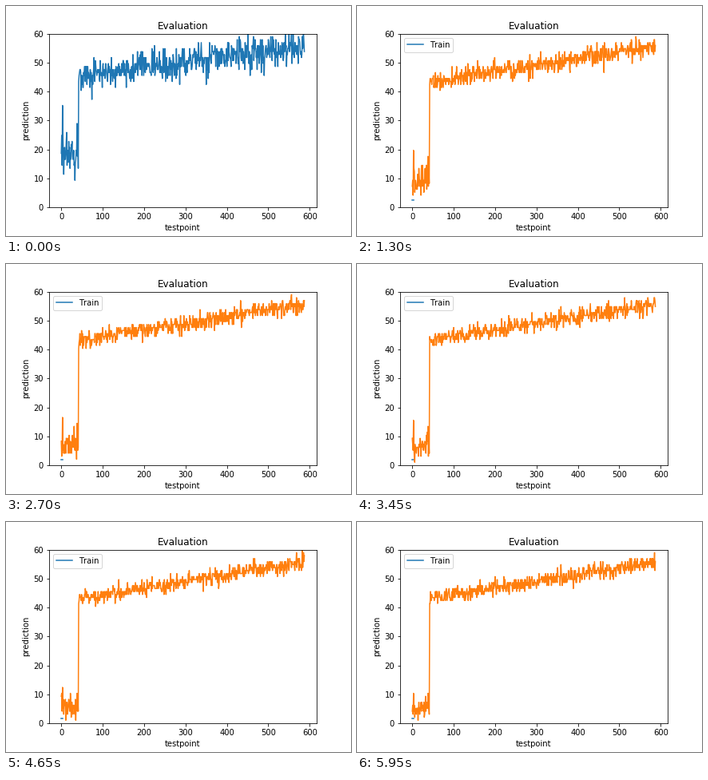
Animation of 432 by 288 pixels, one loop 6 s. Source, as a matplotlib script:

```python
import numpy as np
import matplotlib.pyplot as plt
from matplotlib.animation import FuncAnimation

FRAMES, STEP = 120, 50
POINTS, JUMP = 588, 42
UNIT = 60 / 58  # predictions are whole counts scaled to the axis

x = np.arange(POINTS)
low = x < JUMP
trend = 42.2 + 0.0229 * x


def noise(rng):
    return np.clip(rng.standard_t(8, POINTS) * 0.87, -2.7, 2.7)


# Deviations that persist between epochs, with a spike at each end of the low part
habit = noise(np.random.default_rng(7))
mix = np.full(POINTS, 0.5)
for spot, height in ((2, -1.3), (3, 3.2), (38, 2.8), (41, -0.9)):
    habit[spot], mix[spot] = height, 0.92


def prediction(i):
    early, late = np.exp(-i / 5), np.exp(-i / 50)
    fresh = noise(np.random.default_rng(1000 + i))
    wobble = mix * habit + np.sqrt(1 - mix ** 2) * fresh
    level = np.where(low, 4.5 + 9 * late + 6 * early,
                     trend + 2.4 * early * (1 - x / POINTS))
    spread = np.where(low, 1.9 + 2.4 * late + 0.5 * early,
                      1.4 + 0.5 * late + 0.9 * early)
    return np.maximum(np.round((level + spread * wobble) / UNIT), 0) * UNIT


def loss(i):
    return 1.55 + 1.7 * np.exp(-i / 45)


plt.rcParams.update({"font.family": "DejaVu Sans", "font.size": 10,
                     "text.kerning_factor": 6})
fig, ax = plt.subplots(figsize=(6, 4), dpi=72)
fig.subplots_adjust(left=0.125, right=0.9, bottom=0.125, top=0.88)
train, = ax.plot([], [], color="C0", label="Train")
test, = ax.plot([], [], color="C1")
margin = 0.05 * (POINTS - 1)
ax.set(title="Evaluation", xlabel="testpoint", ylabel="prediction",
       xlim=(-margin, POINTS - 1 + margin), ylim=(0, 60))
legend = ax.legend(handles=[train], loc="upper left")


def draw(i):
    first = i == 0
    test.set_data(x, prediction(i))
    test.set_color("C0" if first else "C1")
    train.set_data([0, 4], [loss(i)] * 2)
    train.set_visible(not first)
    legend.set_visible(not first)
    return train, test, legend


anim = FuncAnimation(fig, draw, frames=FRAMES, interval=STEP,
                     init_func=lambda: draw(0), repeat=True, repeat_delay=0)
plt.show()
```
